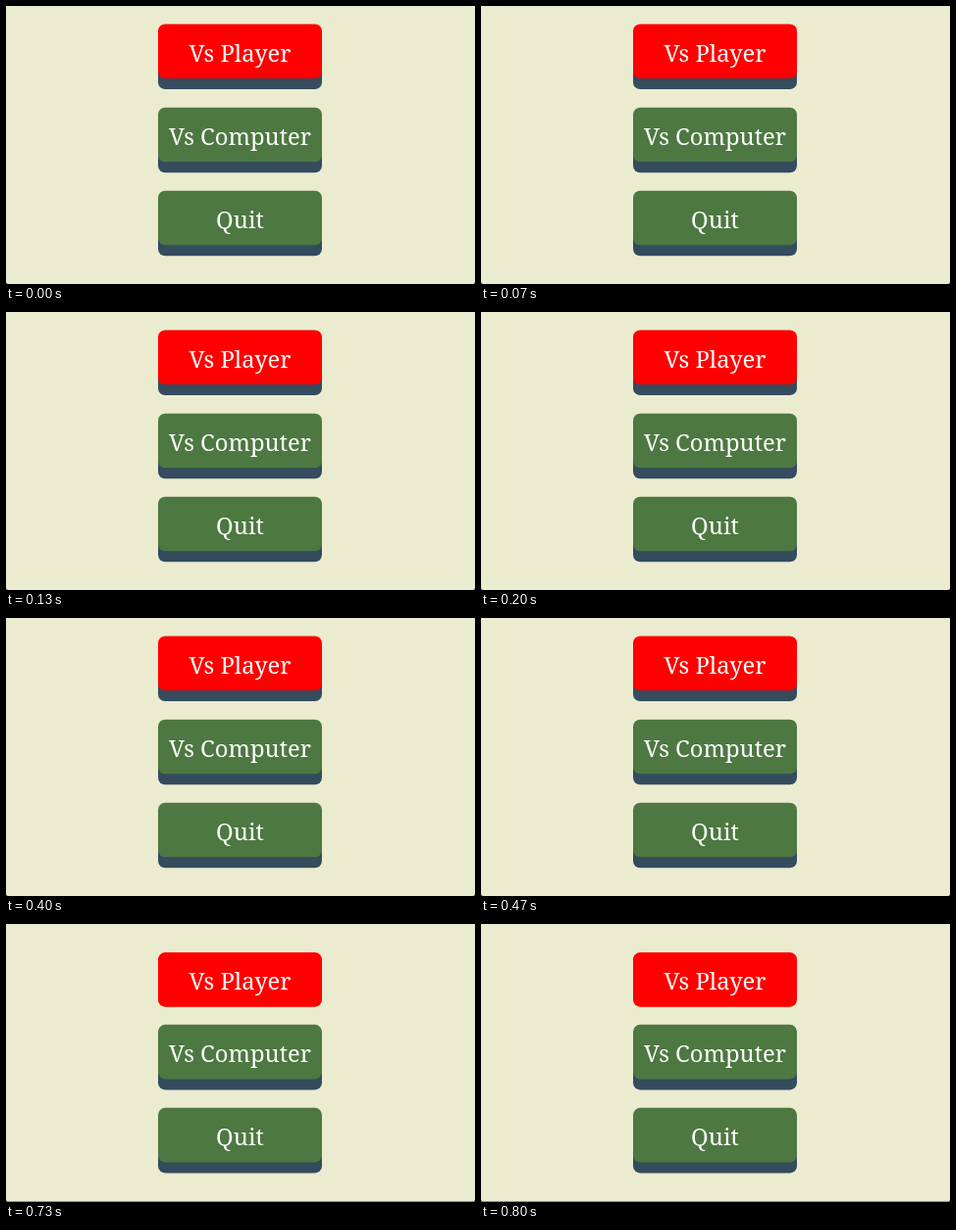
Animation of 478 by 284 pixels, one loop 1470 ms. Source, as an HTML page with a canvas:

```html
<!DOCTYPE html>
<html lang="en">
<head>
<meta charset="utf-8">
<title>Game menu</title>
<style>
  html, body { margin: 0; width: 100%; height: 100%; overflow: hidden; background: #ebebd0; }
  canvas { display: block; }
</style>
</head>
<body>
<canvas id="stage" width="478" height="284"></canvas>
<script>
const ctx = document.getElementById("stage").getContext("2d");
const WIDTH = 478, HEIGHT = 284;
const LOOP = 1470, PRESS_AT = 730;
const BUTTON = { x: 155, width: 167, height: 55.6, depth: 11, radius: 7.2 };
const GREEN = "#4d7841", RED = "#ff0000", SLATE = "#354b5e";

function panel(y, height, color) {
  ctx.fillStyle = color;
  ctx.beginPath();
  ctx.roundRect(BUTTON.x, y, BUTTON.width, height, BUTTON.radius);
  ctx.fill();
}

function button(label, y, color, pressed = false) {
  const top = y + (pressed ? BUTTON.depth : 0);
  if (!pressed) panel(y + BUTTON.depth, BUTTON.height, SLATE);
  panel(top, BUTTON.height, color);
  ctx.fillStyle = "#fff";
  ctx.fillText(label, BUTTON.x + BUTTON.width / 2, top + 38);
}

// Dark desktop showing around the window's rounded lower corners.
function corner(x, direction, y) {
  ctx.beginPath();
  ctx.moveTo(x, y - 2);
  ctx.quadraticCurveTo(x, y, x + 2.5 * direction, y);
  ctx.lineTo(x, y);
  ctx.fill();
}

function draw(time) {
  const pressed = time % LOOP >= PRESS_AT;
  const shift = pressed ? -0.9 : 0;
  const bottom = HEIGHT + shift / 2;
  ctx.fillStyle = "#ebebd0";
  ctx.fillRect(0, 0, WIDTH, HEIGHT);

  ctx.font = '23.8px "Noto Serif", serif';
  ctx.textAlign = "center";
  button("Vs Player", 18.5 + shift / 2, RED, pressed);
  button("Vs Computer", 103.7 + shift, GREEN);
  button("Quit", 188.7 + shift, GREEN);

  ctx.fillStyle = "#33332d";
  ctx.fillRect(0, bottom, WIDTH, HEIGHT - bottom);
  corner(0, 1, bottom);
  corner(WIDTH, -1, bottom);
}

const start = performance.now();
function tick() {
  draw(performance.now() - start);
  requestAnimationFrame(tick);
}
tick();
</script>
</body>
</html>
```
